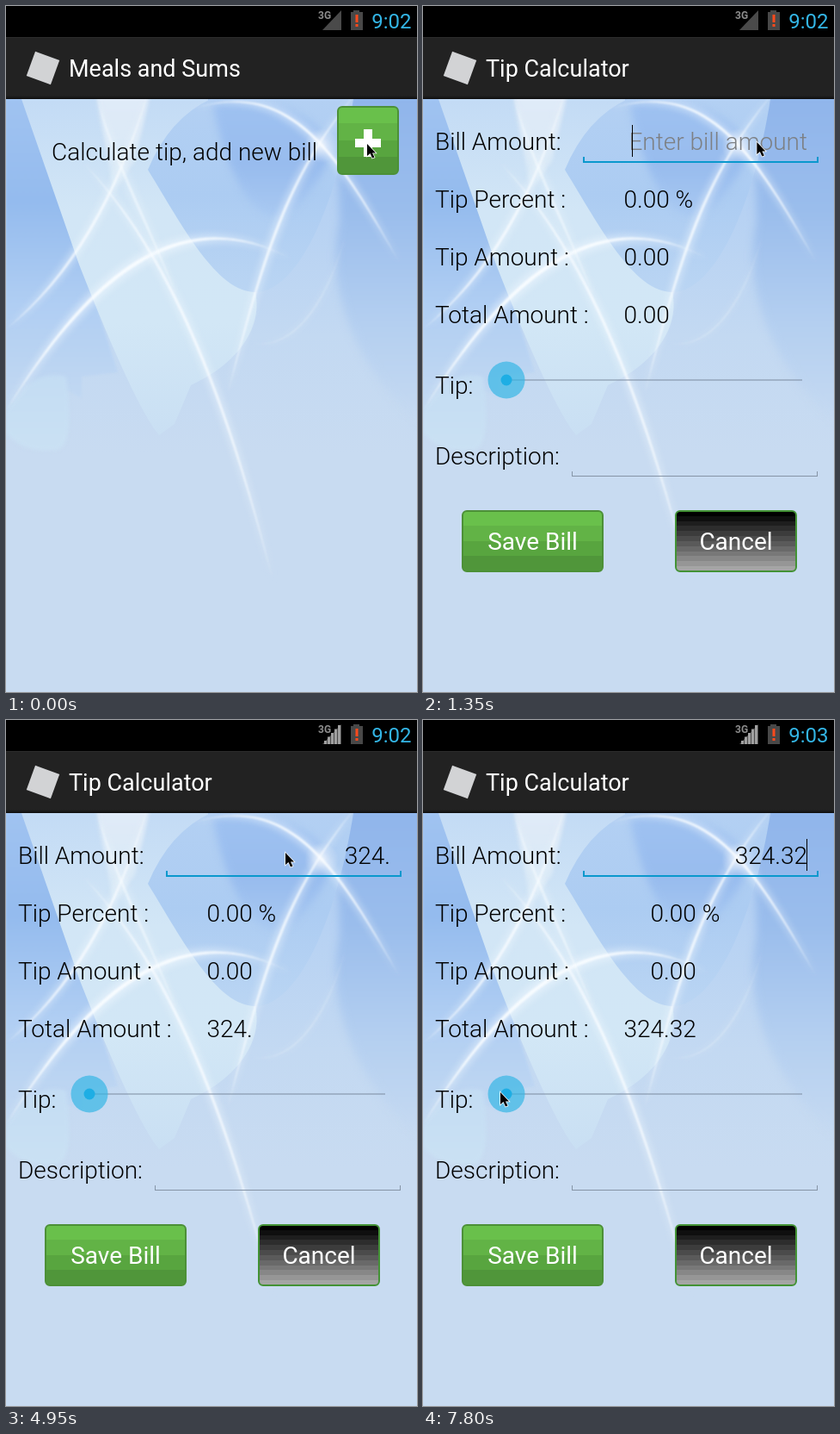
These frames come from a looping animation (478x796 px, 8 s). An HTML page with a canvas:

```html
<!DOCTYPE html>
<html lang="en">
<head>
<meta charset="utf-8">
<title>Tip Calculator</title>
<style>
html, body { margin: 0; width: 100%; height: 100%; overflow: hidden; background: #000; }
canvas { display: block; }
</style>
</head>
<body>
<canvas id="stage" width="478" height="796"></canvas>
<script>
// The phone screen is slightly larger than the visible stage
const W = 480, H = 798, LOOP = 8000, STEP = 150;
const stage = document.getElementById('stage').getContext('2d');

function makeLayer() {
  const canvas = document.createElement('canvas');
  canvas.width = W;
  canvas.height = H;
  return canvas.getContext('2d');
}

const wallpaper = makeLayer(), screen = makeLayer();

// Timeline
const typing = [[0, ''], [2850, '32'], [3150, '324'], [4350, '324.'], [5700, '324.3'], [5850, '324.32']];
const caretSpans = [[900, 1500], [1950, 2400], [2850, 3600], [4050, 4800], [5400, 6300], [6750, 7200], [7800, 8000]];
const pointerPath = [
  [0, 420, 160], [1200, 420, 160], [1650, 325, 154], [6300, 325, 154], [6600, 240, 320],
  [6900, 140, 452], [7200, 120, 432], [7650, 90, 432], [8000, 90, 432]
];

function vertical(c, y0, y1, colors) {
  const gradient = c.createLinearGradient(0, y0, 0, y1);
  colors.forEach((color, i) => gradient.addColorStop(i / (colors.length - 1), color));
  return gradient;
}

function bands(c, y0, y1, colors) {
  const gradient = c.createLinearGradient(0, y0, 0, y1);
  colors.forEach((color, i) => {
    gradient.addColorStop(i / colors.length, color);
    gradient.addColorStop((i + 1) / colors.length, color);
  });
  return gradient;
}

function text(c, str, x, y, color, size, align = 'left', weight = 400) {
  c.font = `${weight} ${size}px Roboto, sans-serif`;
  c.textAlign = align;
  c.fillStyle = color;
  c.fillText(str, x, y);
}

function label(c, str, x, y, align = 'left', color = '#000') {
  text(c, str, x, y, color, 28, align, 300);
}

function rect(c, x, y, w, h, color) {
  c.fillStyle = color;
  c.fillRect(x, y, w, h);
}

function disc(c, x, y, r, color) {
  c.beginPath();
  c.arc(x, y, r, 0, 7);
  c.fillStyle = color;
  c.fill();
}

function paintWallpaper(c) {
  const shape = (path, y0, y1, colors, blur = 0) => {
    c.filter = blur ? `blur(${blur}px)` : 'none';
    c.fillStyle = vertical(c, y0, y1, colors);
    c.fill(new Path2D(path));
  };
  // A lens between two cubic curves that share their ends, widened across its chord
  const streak = (x0, y0, x1, y1, x2, y2, x3, y3, width, alpha) => {
    const length = Math.hypot(x3 - x0, y3 - y0);
    const nx = (y0 - y3) / length, ny = (x3 - x0) / length;
    const lens = k => new Path2D(
      `M${x0} ${y0}C${x1 - k * nx} ${y1 - k * ny} ${x2 - k * nx} ${y2 - k * ny} ${x3} ${y3}` +
      `C${x2 + k * nx} ${y2 + k * ny} ${x1 + k * nx} ${y1 + k * ny} ${x0} ${y0}`);
    c.fillStyle = `rgba(240,248,255,${alpha * 0.6})`;
    c.filter = 'blur(4px)';
    c.fill(lens(width * 1.5));
    c.fillStyle = `rgba(250,253,255,${alpha})`;
    c.filter = 'blur(0.8px)';
    c.fill(lens(width * 0.5));
  };

  rect(c, 0, 0, W, H, vertical(c, 108, 520, ['#a8c8f2', '#b7d2f3', '#c3d9f2', '#c8dbf1']));
  shape('M0 100H18L80 270 130 425 88 430V455L60 440 0 470Z', 108, 465, ['#a0c3f1', '#94bbee', '#b0cef3', '#c3d9f2'], 1);
  shape('M0 470Q30 420 70 430Q80 510 60 515Q20 520 0 495Z', 420, 515, ['#c3dcf3', '#cae1f3'], 2);
  shape('M18 108H235V250L290 332C300 380 260 420 215 440L196 485 178 498Q150 465 85 300Z',
    108, 498, ['#c3dbf5', '#d2e6f6', '#d2e7f6', '#c9dff3']);
  shape('M385 100H490V490C410 430 370 330 388 250Z', 108, 500, ['#90b5eb', '#9abdec', '#b4cff0', '#c8dbf1'], 5);
  shape('M105 100H168L150 180 125 215Z', 108, 215, ['#e0ebf8', '#d6e8f6'], 2);
  shape('M238 108Q190 130 165 190C205 255 245 332 290 332C340 332 385 230 404 108Z', 108, 332, ['#b3d0f3', '#acccf2', '#bad5f3']);
  shape('M240 112C260 215 300 265 335 235C372 200 390 160 366 146Q330 105 240 112Z', 108, 260, ['#9fc2f1', '#98bcee', '#adccf2'], 4);

  streak(0, 470, 75, 350, 185, 212, 335, 295, 6, 0.9);
  streak(0, 375, 75, 315, 130, 220, 165, 100, 4, 0.8);
  streak(88, 180, 190, 285, 255, 450, 311, 668, 4, 0.8);
  streak(104, 100, 125, 180, 160, 240, 200, 340, 4, 0.55);
  streak(215, 120, 330, 82, 385, 170, 458, 298, 4, 0.9);
  streak(408, 100, 325, 200, 300, 290, 258, 450, 4, 0.85);
  streak(280, 390, 335, 405, 375, 340, 395, 265, 2, 0.3);
  const glow = c.createRadialGradient(367, 162, 1, 367, 162, 20);
  glow.addColorStop(0, 'rgba(255,255,255,.6)');
  glow.addColorStop(1, 'rgba(255,255,255,0)');
  c.filter = 'none';
  rect(c, 340, 135, 55, 55, glow);
}

function paintBase(c, title) {
  c.drawImage(wallpaper.canvas, 0, 0);
  rect(c, 0, 36, W, 72, '#222');
  rect(c, 0, 36, W, 1, '#2b2b2b');
  rect(c, 0, 104, W, 4, vertical(c, 104, 108, ['#222', '#0e0e0e']));
  c.save();
  c.translate(43, 72);
  c.rotate(0.35);
  rect(c, -15, -15, 30, 30, '#d2d3d5');
  c.restore();
  text(c, title, 73, 82, '#fff', 27);
}

function button(c, x, y, w, h, colors, border) {
  c.beginPath();
  c.roundRect(x, y, w, h, 5);
  c.fillStyle = bands(c, y, y + h, colors);
  c.fill();
  c.strokeStyle = border;
  c.lineWidth = 2;
  c.stroke();
}

const greens = ['#69c04b', '#62b346', '#58a53f', '#50963a'];
const grays = Array.from({ length: 12 }, (_, i) => `rgb(${[0, 0, 0].fill(i * 15)})`);

function paintHome(c) {
  paintBase(c, 'Meals and Sums');
  label(c, 'Calculate tip, add new bill', 53, 179);
  button(c, 386, 117, 70, 78, greens, '#4c9037');
  rect(c, 406, 154, 30, 10, '#fff');
  rect(c, 416, 143, 10, 32, '#fff');
}

function field(c, x0, x1, y, thick, color) {
  rect(c, x0, y, x1 - x0, thick, color);
  for (const x of [x0, x1 - thick]) rect(c, x, y - 5, thick, 5, color);
}

function paintCalculator(c, bill, caret) {
  paintBase(c, 'Tip Calculator');
  const labels = [['Bill Amount:', 167], ['Tip Percent :', 234], ['Tip Amount :', 301],
    ['Total Amount :', 368], ['Tip:', 450], ['Description:', 532]];
  for (const [name, y] of labels) label(c, name, 14, y);

  label(c, bill || 'Enter bill amount', 447, 167, 'right', bill ? '#000' : '#7d8084');
  if (caret) rect(c, bill ? 446 : 243, 138, 1, 37, '#000');
  field(c, 186, 460, 180, 2, '#0a98cd');
  field(c, 173, 459, 545, 1, '#8694a6');

  const total = bill || '0.00';
  const right = 233.5 + Math.max(c.measureText('0.00').width, c.measureText(total).width);
  label(c, '0.00', right, 234, 'right');
  label(c, ' %', right, 234);
  label(c, '0.00', right, 301, 'right');
  label(c, total, right, 368, 'right');

  rect(c, 97, 433, 344, 2, 'rgba(125,140,160,.5)');
  disc(c, 97, 434, 21.5, 'rgba(51,181,229,.68)');
  disc(c, 97, 434, 6.5, '#1eaee4');

  button(c, 46, 586, 163, 70, greens, '#4c9037');
  text(c, 'Save Bill', 127.5, 631, '#fff', 28, 'center');
  button(c, 294, 586, 140, 70, grays, '#439235');
  text(c, 'Cancel', 364, 631, '#fff', 28, 'center');
}

function paintStatus(c, t) {
  rect(c, 0, 0, W, 36, '#000');
  text(c, '3G', 363, 15, '#8c8c8c', 12, 'left', 700);
  c.fillStyle = '#4a4a4a';
  c.fill(new Path2D('M390 5V28H368Z'));
  if (t >= 4950) {
    for (let i = 0; i < 5; i++) {
      const height = 4 + i * 4.5;
      rect(c, 370 + i * 4, 28 - height, 3, height, '#a0a0a0');
    }
  }
  rect(c, 404, 5, 7, 3, '#484848');
  rect(c, 401, 7, 14, 21, '#484848');
  rect(c, 406.5, 10, 3, 9, '#ff4a1c');
  rect(c, 406.5, 21, 3, 3, '#ff4a1c');
  text(c, t < 5700 ? '9:02' : '9:03', 471.5, 26, '#33b5e5', 24, 'right');
}

function paintPointer(c, t) {
  const i = pointerPath.findIndex(p => p[0] > t);
  const [t0, x0, y0] = pointerPath[i - 1], [t1, x1, y1] = pointerPath[i];
  const k = (t - t0) / (t1 - t0);
  const arrow = new Path2D('M0 0V14L3.5 11 6 16.5 8.5 15.5 6 10.5H10Z');
  c.save();
  c.translate(x0 + (x1 - x0) * k, y0 + (y1 - y0) * k);
  c.strokeStyle = '#fff';
  c.lineWidth = 1.5;
  c.stroke(arrow);
  c.fillStyle = '#000';
  c.fill(arrow);
  c.restore();
}

function showScreen(scale, alpha) {
  stage.save();
  stage.translate(W / 2, H / 2);
  stage.scale(scale, scale);
  stage.translate(-W / 2, -H / 2);
  stage.globalAlpha = alpha;
  stage.drawImage(screen.canvas, 0, 36, W, H - 36, 0, 36, W, H - 36);
  stage.restore();
}

function paint(time) {
  const t = Math.floor(time / STEP) * STEP;
  rect(stage, 0, 0, W, H, '#000');
  if (t < 1050) paintHome(stage);
  if (t >= 900) {
    const bill = typing.filter(([at]) => at <= t).pop()[1];
    const caret = caretSpans.some(([on, off]) => t >= on && t < off);
    paintCalculator(screen, bill, caret);
    if (t < 1050) {
      rect(stage, 0, 36, W, H - 36, 'rgba(0,0,0,.17)');
      showScreen(0.92, 0.6);
    } else if (t < 1200) {
      showScreen(0.996, 0.985);
    } else {
      showScreen(1, 1);
    }
  }
  paintStatus(stage, t);
  paintPointer(stage, t);
}

paintWallpaper(wallpaper);
const start = performance.now();
function tick() {
  paint((performance.now() - start) % LOOP);
  requestAnimationFrame(tick);
}
tick();
</script>
</body>
</html>
```
